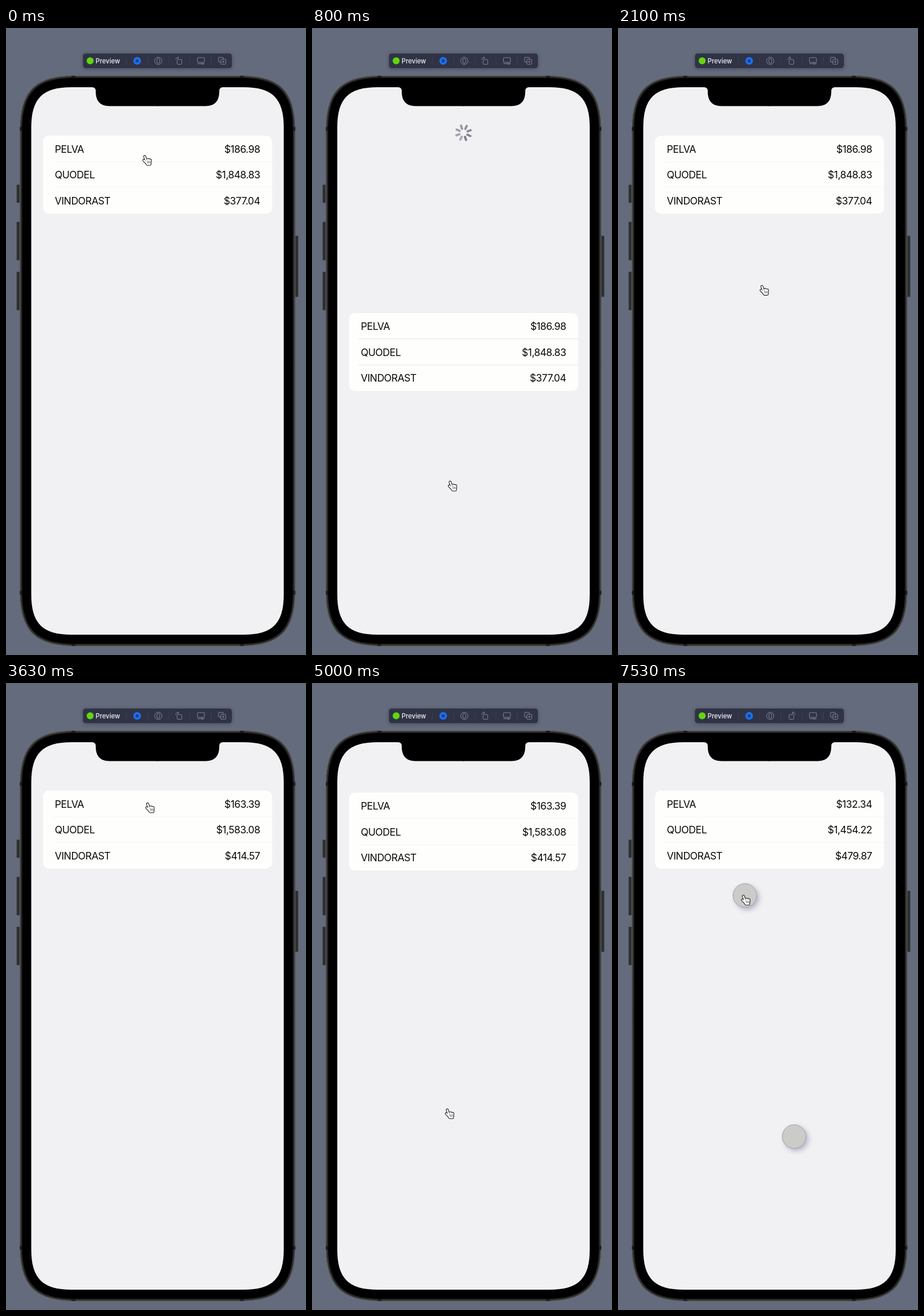
An HTML page with a canvas that plays this animation: 518x1080 px, repeating every 7660 ms.

```html
<!DOCTYPE html>
<html lang="en">
<head>
<meta charset="utf-8">
<title>Pull to refresh</title>
<style>
  html, body { margin: 0; width: 100%; height: 100%; overflow: hidden; background: #646b7c; }
  canvas { display: block; width: 518px; height: 1080px; }
</style>
</head>
<body>
<canvas id="stage" width="518" height="1080"></canvas>
<script>
const ctx = document.getElementById('stage').getContext('2d');
const LOOP = 7660;
const MID = 261.6;

const names = ['PELVA', 'QUODEL', 'VINDORAST'];
const quotes = [
  { at: 0, prices: ['$186.98', '$1,848.83', '$377.04'] },
  { at: 2430, prices: ['$163.39', '$1,583.08', '$414.57'] },
  { at: 6300, prices: ['$132.34', '$1,454.22', '$479.87'] }
];

// Pointer glides: from time, to time, x, y
const home = { x: 244, y: 228 };
const glides = [
  [100, 640, 243, 789], [1150, 1560, 253, 452], [2100, 2200, 277, 182],
  [2480, 2760, 257, 215], [3060, 3300, 249, 215], [3630, 3800, 245, 452],
  [4000, 4300, 238, 742], [5030, 5200, 238, 352], [5400, 5500, 221, 374]
];

const drags = [
  { start: 100, trigger: 370, release: 900 },
  { start: 3630, trigger: 4110, release: 4460 }
];

const clamp = v => Math.max(0, Math.min(1, v));
const smooth = v => { v = clamp(v); return v * v * (3 - 2 * v); };

function pointer(t) {
  let { x, y } = home;
  for (const [from, to, toX, toY] of glides) {
    const k = smooth((t - from) / (to - from));
    x += (toX - x) * k;
    y += (toY - y) * k;
  }
  return { x, y };
}

// Rubber-band distance plus the extra inset once refreshing
function pulled(d, t) {
  const x = Math.max(0, pointer(t).y - pointer(d.start).y);
  const band = 943 * (1 - 1 / (x * 0.55 / 943 + 1));
  return band + 73 * smooth((t - d.trigger) / 280);
}

function listOffset(d, t) {
  if (!d) return 0;
  if (t <= d.release) return pulled(d, t);
  const k = 12 * (t - d.release) / 1000;
  const off = pulled(d, d.release) * (1 + k) * Math.exp(-k);
  return off < 0.15 ? 0 : off;
}

function paint(fill, stroke, width = 0.9) {
  if (fill) { ctx.fillStyle = fill; ctx.fill(); }
  if (stroke) { ctx.strokeStyle = stroke; ctx.lineWidth = width; ctx.stroke(); }
}

function box(x, y, w, h, r, ...style) {
  ctx.beginPath();
  ctx.roundRect(x, y, w, h, r);
  paint(...style);
}

function disc(x, y, r, ...style) {
  ctx.beginPath();
  ctx.arc(x, y, r, 0, Math.PI * 2);
  paint(...style);
}

function line(color, width, ...points) {
  ctx.beginPath();
  for (let i = 0; i < points.length; i += 2) ctx.lineTo(points[i], points[i + 1]);
  paint(null, color, width);
}

function label(text, x, y, font, color, spacing, align = 'left') {
  ctx.font = font + ' Inter, "Noto Sans", sans-serif';
  ctx.letterSpacing = spacing + 'px';
  ctx.textAlign = align;
  ctx.fillStyle = color;
  ctx.fillText(text, x, y);
}

function shadow(color, blur, dx, dy) {
  ctx.shadowColor = color;
  ctx.shadowBlur = blur;
  ctx.shadowOffsetX = dx;
  ctx.shadowOffsetY = dy;
}

// Screen outline grown by a margin, with continuous-curvature corners
function body(grow, fill, stroke) {
  const w = 218 + grow, h = 471.5 + grow, r = 54.5 + grow;
  const e = r * 1.28, c = r * 0.355;
  ctx.save();
  ctx.translate(MID, 573.4);
  ctx.beginPath();
  for (const [sx, sy] of [[1, -1], [1, 1], [-1, 1], [-1, -1]]) {
    const side = [[w - e, h, w - c, h], [w, h - c, w, h - e]];
    if (sx === sy) side.reverse();
    const [a, b] = side;
    const first = sx === sy ? [a[2], a[3], a[0], a[1]] : a;
    const last = sx === sy ? [b[2], b[3], b[0], b[1]] : b;
    ctx.lineTo(sx * first[0], sy * first[1]);
    ctx.bezierCurveTo(sx * first[2], sy * first[3], sx * last[0], sy * last[1], sx * last[2], sy * last[3]);
  }
  ctx.closePath();
  paint(fill, stroke, 1);
  ctx.restore();
}

function drawToolbar(flipped) {
  const gray = '#8b8e9a', bar = '#2f3345';
  ctx.save();
  shadow('rgba(20,22,36,.4)', 6, 0, 1);
  box(133, 44, 257, 25, 4.5, bar);
  ctx.restore();
  disc(145.3, 56.5, 6, '#62d60f');
  label('Preview', 154.8, 60.6, '500 11.1px', '#f2f3f6', 0);
  for (let x = 208; x < 360; x += 36.6) line('#3d4154', 1, x, 49, x, 64);

  disc(226.5, 56.6, 6.6, '#1b70fb');
  box(223.9, 54, 5.2, 5.2, 1, '#1f3f86');
  disc(263, 56.6, 6.3, null, gray);
  box(260.6, 52.7, 4.8, 7.8, 1.6, null, gray);

  ctx.save();
  if (flipped) { ctx.translate(599, 0); ctx.scale(-1, 1); }
  box(295.5, 54.3, 8, 8.2, 1.2, null, gray);
  line(gray, 0.9, 293.4, 54.6, 293.4, 52.4, 294.6, 51.2, 298, 51.2);
  line(gray, 0.9, 296.2, 49.2, 298.2, 51.2, 296.2, 53.2);
  ctx.restore();

  box(330.5, 51, 12.2, 8.2, 1.2, null, gray);
  line(gray, 0.9, 330.5, 61.5, 343, 61.5);
  disc(339, 61.5, 1.3, bar, gray);
  box(367, 50.6, 8.4, 8.2, 1, null, gray);
  box(371, 54, 8.4, 8.4, 1, bar, gray);
  line(gray, 0.9, 373.2, 58.2, 377.2, 58.2);
  line(gray, 0.9, 375.2, 56.2, 375.2, 60.2);
}

function drawPhone() {
  const button = (x, y, h) => box(x, y, 5, h, 1, '#2d2e2f', '#47494d', 0.6);
  button(18.5, 270, 31);
  button(18.5, 334, 66);
  button(18.5, 420, 66);
  button(499.5, 358, 105);

  body(19.8, '#2b2b2a');
  body(19.2, null, '#64645f');
  ctx.fillStyle = '#1b1b1a';
  for (const y of [170.5, 969.5]) ctx.fillRect(24, y, 475.4, 6.5);
  for (const x of [113, 404]) ctx.fillRect(x, 82.3, 6.5, 982);
  body(15.8, '#000');
  body(0, '#f1f1f4');

  ctx.fillStyle = '#000';
  ctx.beginPath();
  for (const s of [-1, 1]) {
    ctx.moveTo(MID, 101);
    ctx.lineTo(MID + s * 113, 101);
    ctx.lineTo(MID + s * 113, 102);
    ctx.quadraticCurveTo(MID + s * 106.7, 102, MID + s * 106.7, 108.5);
    ctx.bezierCurveTo(MID + s * 106.7, 126, MID + s * 99, 134.4, MID + s * 83, 134.4);
    ctx.lineTo(MID, 134.4);
  }
  ctx.fill();
  ctx.fillRect(MID - 1, 101, 2, 33.4);
}

function drawSpinner(d, t, off) {
  if (!d) return;
  const age = (t - d.trigger) / 1000;
  const active = age >= 0;
  const gone = smooth((t - d.release - 120) / 260);
  if (gone >= 1) return;
  const shown = active ? 8 : 8 * clamp((off - 50) / 95);
  const size = (1 + 0.25 * Math.sin(Math.PI * clamp(age / 0.3))) * (1 - 0.5 * gone);
  const lead = 3 + Math.floor(Math.max(0, age - 0.45) * 8);
  ctx.save();
  ctx.translate(MID, 180.5);
  ctx.scale(size, size);
  ctx.rotate(Math.max(0, 75 * age - 7) * Math.PI / 180);
  ctx.lineCap = 'round';
  for (let i = 0; i < 8; i++) {
    const fade = active ? 1 - 0.4 * ((lead - i + 8) % 8) / 7 : 0.75;
    ctx.globalAlpha = fade * clamp(shown - i) * (1 - gone);
    line('#7d7a88', 3.8, 0, -7.4, 0, -13.1);
    ctx.rotate(Math.PI / 4);
  }
  ctx.restore();
}

function drawList(off, t) {
  const top = 185.4 + off, row = 44.75;
  const prices = quotes.filter(q => t >= q.at).pop().prices;
  box(64, top, 395.4, row * 3, 10, '#fefefd');
  ctx.fillStyle = `rgba(60,60,67,${0.04 + 0.09 * off / 300})`;
  for (const i of [1, 2]) ctx.fillRect(80.5, Math.floor(top + row * i), 379, 1);
  names.forEach((name, i) => {
    const y = top + 29.1 + row * i;
    label(name, 84.3, y, '400 17.3px', '#080808', -0.5);
    label(prices[i], 438.6, y, '400 17.3px', '#080808', -0.5, 'right');
  });
}

function drawTouch(x, y) {
  ctx.save();
  shadow('rgba(110,100,140,.45)', 8, 4, 4);
  disc(x, y, 20.5, '#cbcbca');
  ctx.restore();
  disc(x, y, 20.4, null, '#a2a2a0', 1);
}

// A hand built from round-capped strokes: dark outline first, white on top
function drawHand({ x, y }) {
  ctx.save();
  ctx.translate(x, y);
  ctx.lineCap = ctx.lineJoin = 'round';
  for (const [color, width] of [['#262626', 4.8], ['#fff', 2.5]]) {
    line(color, width, -4.5, -6.7, -0.8, 4);
    line(color, width, -6, -0.2, -2.2, 3.6, 0, 6.7, 4.6, 6.7);
    for (let i = 0; i < 3; i++) line(color, width, 0.6 + 2.3 * i, 0.6 * i - 1.7, 0.8 + 2 * i, 5.4);
  }
  for (let i = 0; i < 3; i++) line('#444', 0.8, 0.2 + 2.2 * i, 1.4, 0.6 + 2.1 * i, 4.8);
  ctx.restore();
}

function draw(t) {
  const d = drags.filter(g => t >= g.start).pop();
  const off = listOffset(d, t);
  const touching = t >= 7500;
  ctx.fillStyle = '#646b7c';
  ctx.fillRect(0, 0, 518, 1080);
  drawToolbar(touching);
  drawPhone();
  drawSpinner(d, t, off);
  drawList(off, t);
  if (touching) {
    drawTouch(219, 366);
    drawTouch(304, 781.3);
  }
  drawHand(pointer(t));
}

const begin = performance.now();
function tick() {
  draw((performance.now() - begin) % LOOP);
  requestAnimationFrame(tick);
}
tick();
</script>
</body>
</html>
```
